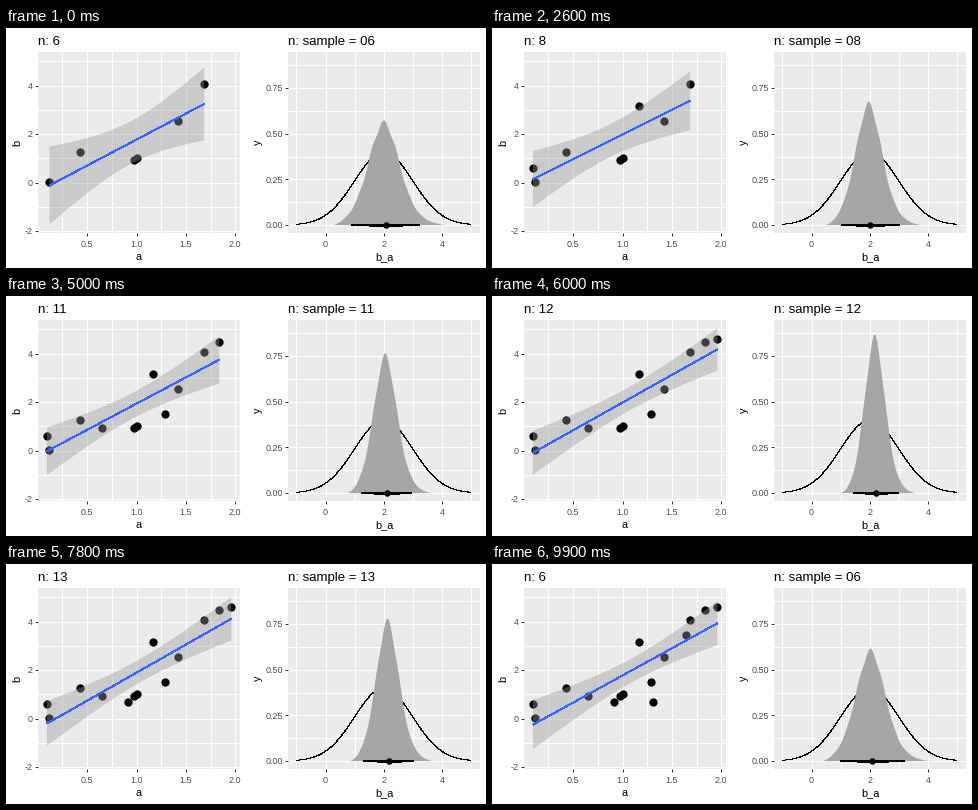
A matplotlib script for the animation above (10000 ms loop, 480x240 px).

```python
import numpy as np
import matplotlib.pyplot as plt
from matplotlib.animation import FuncAnimation
from matplotlib.ticker import FixedLocator

plt.rcParams["font.family"] = "Liberation Sans"

W, H, DPI = 480, 240, 80
PX = 72 / DPI  # points per pixel
TOP, BOTTOM = 24, 205
FIRST_N = 6
HOLD, MOVE = 5, 5
STEPS = HOLD + MOVE

# Observations (a, b) in the order they are added
DATA = np.array([
    (.118, .01), (.424, 1.27), (.978, .92), (1.009, 1.03), (1.421, 2.56),
    (1.685, 4.08), (.093, .61), (1.166, 3.17), (1.838, 4.49), (.648, .95),
    (1.288, 1.52), (1.96, 4.61), (.917, .70), (1.309, .70), (1.644, 3.46)])
STATES = len(DATA) - FIRST_N + 1

fig = plt.figure(figsize=(W / DPI, H / DPI), dpi=DPI, facecolor="white")


def label(x, y, s, size, color="black", **kw):
    return fig.text(x / W, 1 - y / H, s, fontsize=size * PX, color=color,
                    va="baseline", **kw)


def panel(left, right, xlim, ylim, xticks, yticks, names, digits):
    """Grey panel with white grid, outside ticks, labels and axis titles."""
    ax = fig.add_axes([left / W, 1 - BOTTOM / H,
                       (right - left) / W, (BOTTOM - TOP) / H])
    ax.set(xlim=xlim, ylim=ylim, facecolor="#EBEBEB")
    ax.set_axisbelow(True)
    for side in ax.spines.values():
        side.set_visible(False)
    for axis, ticks in ((ax.xaxis, xticks), (ax.yaxis, yticks)):
        half = (ticks[1] - ticks[0]) / 2
        axis.set_major_locator(FixedLocator(ticks))
        axis.set_minor_locator(
            FixedLocator([ticks[0] - half] + [t + half for t in ticks]))
    ax.grid(True, which="both", color="white", linewidth=PX)
    ax.tick_params(which="major", length=3 * PX, width=PX, color="#333333",
                   labelbottom=False, labelleft=False)
    ax.tick_params(which="minor", length=0)

    for t in xticks:
        x = left + (t - xlim[0]) / (xlim[1] - xlim[0]) * (right - left)
        label(x, 219, f"{t:.{digits[0]}f}", 9, "#4D4D4D", ha="center")
    for t in yticks:
        y = BOTTOM - (t - ylim[0]) / (ylim[1] - ylim[0]) * (BOTTOM - TOP)
        label(left - 5, y + 3.2, f"{t:.{digits[1]}f}", 9, "#4D4D4D", ha="right")
    label((left + right) / 2, 232, names[0], 11, ha="center")
    label(left - 17.5 - 10 * digits[1] / 2, (TOP + BOTTOM) / 2, names[1], 11,
          rotation=90, rotation_mode="anchor", ha="center")
    return ax


def t_975(dof):
    """Series for the 97.5% quantile of Student's t."""
    z = 1.96
    return (z + (z**3 + z) / (4 * dof)
            + (5 * z**5 + 16 * z**3 + 3 * z) / (96 * dof**2))


def analyse(k):
    """Line with 95% band, posterior slab and interval limits for state k."""
    a, b = DATA[:FIRST_N + k].T
    n = len(a)
    slope, icept = np.polyfit(a, b, 1)
    sxx = np.sum((a - a.mean()) ** 2)
    sigma = np.sqrt(np.sum((b - icept - slope * a) ** 2) / (n - 2))
    x = np.linspace(a.min(), a.max(), 80)
    err = t_975(n - 2) * sigma * np.sqrt(1 / n + (x - a.mean()) ** 2 / sxx)
    line = x, icept + slope * x, err

    # Slope posterior under a normal(2, 1) prior, with heavy tails
    precision = sxx / sigma**2
    mid = (slope * precision + 2) / (precision + 1) - .04
    sd = 1 / np.sqrt(precision + 1)
    lo, hi, mode = mid - 3.5 * sd, mid + 4.1 * sd, mid - .12 * sd
    v = np.linspace(lo, hi, 300)
    h = (1 + ((v - mode) / (1.07 * sd)) ** 2 / 8) ** -4.5
    h *= np.tanh(3 * (v - lo)) * np.tanh(3 * (hi - v))
    h *= 1 + .025 * np.cos(14 * (v - mode))
    h *= .295 / sd / h.max()
    limits = mid + sd * np.array([-2.3, -1.1, 0, 1.1, 2.3])
    return line, (v, h, limits)


fits, posts = zip(*map(analyse, range(STATES)))

left = panel(32, 234, (.002, 2.048), (-2.08, 5.39), [.5, 1, 1.5, 2],
             [-2, 0, 2, 4], ("a", "b"), (1, 0))
right = panel(282, 474, (-1.29, 5.31), (-.043, .947), [0, 2, 4],
              [0, .25, .5, .75], ("b_a", "y"), (0, 2))

# Hard-edged strokes cover every touched pixel, so widths are set narrow
crisp = dict(antialiased=False, solid_capstyle="butt")
dots = left.scatter([], [], s=(8.3 * PX) ** 2, color="black", linewidths=0,
                    antialiased=False, zorder=3)
band, = left.fill([0, 1, 1], [0, 0, 1], color="#999999", alpha=.4, lw=0,
                  zorder=4)
line, = left.plot([], [], color="#3366FF", lw=PX, zorder=5, **crisp)

grid = np.linspace(-1, 5, 201)
right.plot(grid, np.exp(-(grid - 2) ** 2 / 2) / np.sqrt(2 * np.pi),
           color="black", lw=.1 * PX, zorder=3, **crisp)
slab, = right.fill([0, 1, 1], [0, 0, 1], color="#A6A6A6", lw=0, zorder=4)
thin, = right.plot([], [], color="black", lw=1.6 * PX, zorder=5, **crisp)
thick, = right.plot([], [], color="black", lw=3 * PX, zorder=5, **crisp)
center, = right.plot([], [], "o", color="black", ms=6.5 * PX, mew=0, zorder=6)

title_left = label(32, 17, "", 13.2, ha="left")
title_right = label(281.5, 17, "", 13.2, ha="left")


def outline(x, low, high):
    return np.column_stack([np.r_[x, x[::-1]], np.r_[high, low[::-1]]])


def draw(i):
    k, step = divmod(i, STEPS)
    nxt = (k + 1) % STATES
    p = max(0, step - HOLD) / MOVE

    # The scatter and fit switch only when a state is reached
    x, y, err = fits[k]
    dots.set_offsets(DATA[:FIRST_N + k])
    band.set_xy(outline(x, y - err, y + err))
    line.set_data(x, y)

    # The posterior moves linearly between states
    x, h, lim = [(1 - p) * u + p * v for u, v in zip(posts[k], posts[nxt])]
    slab.set_xy(outline(x, np.zeros_like(x), h))
    thin.set_data(lim[[0, 4]], [0, 0])
    thick.set_data(lim[[1, 3]], [0, 0])
    center.set_data([lim[2]], [0])

    shown = FIRST_N + (nxt if p > .7 else k)
    title_left.set_text(f"n: {shown}")
    title_right.set_text(f"n: sample = {shown:02d}")
    return dots, band, line, slab, thin, thick, center, title_left, title_right


anim = FuncAnimation(fig, draw, frames=STATES * STEPS, interval=100,
                     repeat=True, repeat_delay=0, blit=False)
plt.show()
```
